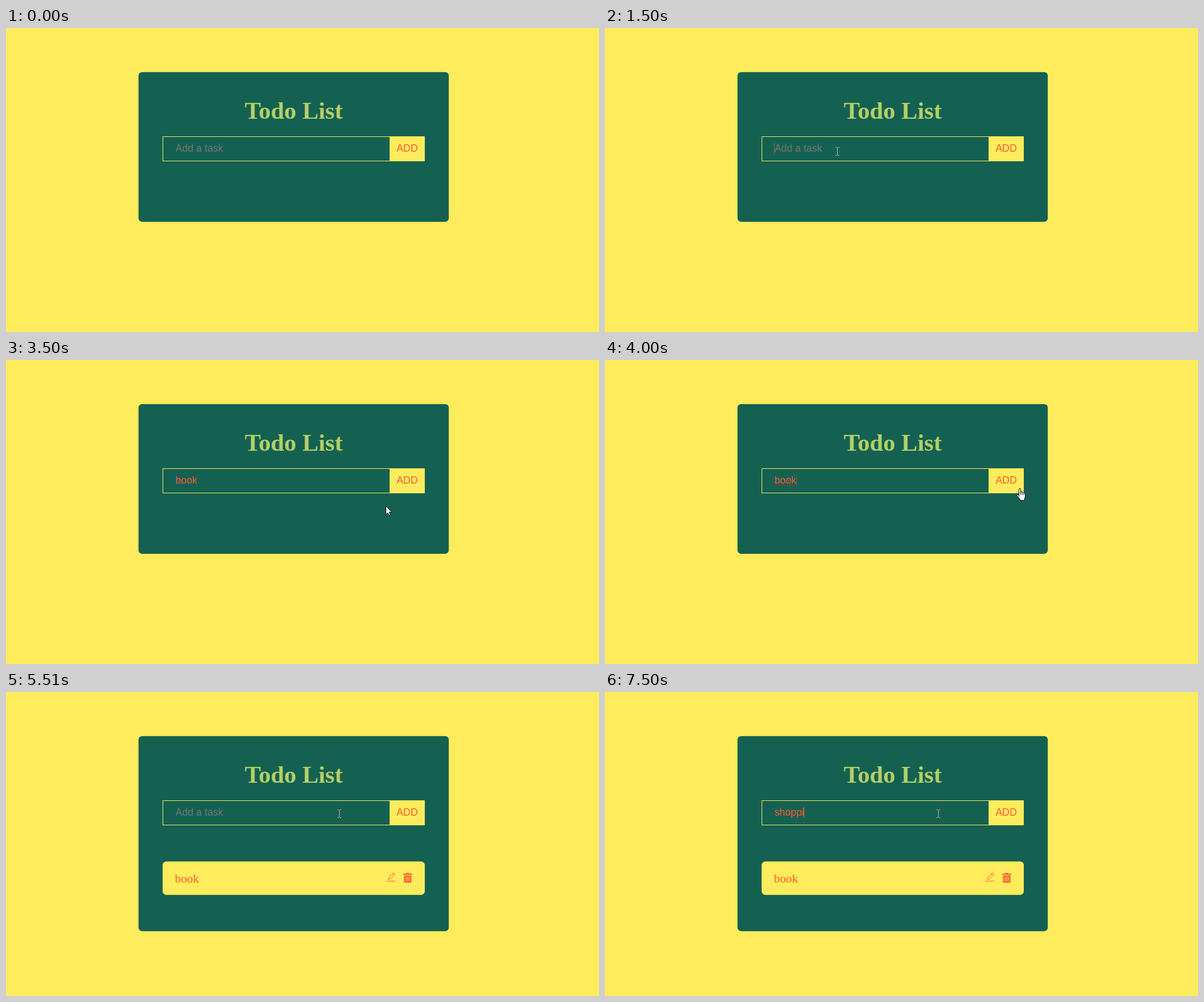
These frames come from a looping animation (1045x536 px, 8000 ms). An HTML page:

```html
<!DOCTYPE html>
<html lang="en">
<head>
<meta charset="utf-8">
<title>Todo List</title>
<style>
  :root { --sun: #ffec5c; --pine: #146152; --lime: #b4cf66; --coral: #ff5a33; }
  html, body { margin: 0; width: 100%; height: 100%; overflow: hidden; background: var(--sun); }
  svg { display: block; width: 100vw; height: 100vh; }
  rect { shape-rendering: crispEdges; }
  .round { shape-rendering: auto; }
  .sans { font: 17.78px "Liberation Sans", Arial, sans-serif; }
  .serif { font: 21.33px "Liberation Serif", "Times New Roman", serif; }
  .title { font-size: 42.67px; font-weight: 700; fill: var(--lime); }
  .coral { fill: var(--coral); }
  .sun { fill: var(--sun); }
  .line { fill: none; stroke: var(--coral); }
  .pointer { fill: #fff; stroke: #000; stroke-linejoin: round; }
</style>
</head>
<body>
<svg viewBox="0 0 1045 536">
  <rect class="round" id="card" x="233.5" y="77.7" width="546.8" rx="6.5" fill="var(--pine)"/>
  <text class="serif title" x="507" y="160" text-anchor="middle">Todo List</text>

  <rect x="276.5" y="191.5" width="461" height="43" fill="none" stroke="var(--sun)"/>
  <rect class="sun" x="676" y="191" width="62" height="44"/>
  <text class="sans coral" x="707" y="218" text-anchor="middle">ADD</text>
  <text class="sans" id="entry" x="298.67" y="218"></text>
  <path class="line" id="squiggle" style="stroke:#e8171b"/>
  <rect class="coral" id="caret" y="203" width="1" height="19"/>

  <g id="item">
    <rect class="round sun" x="276" y="298.8" width="462" height="58.9" rx="6.5"/>
    <text class="serif coral" x="297.5" y="335.5">book</text>
    <path class="line" d="M673.5 330.5l1.2-4 8.3-8 2.7 2.7-8.3 8.1zM680.6 320.6l2.8 2.8M670 333.5h16.5"/>
    <path class="coral" d="M700 320.3h5.2v-1.3h5.4v1.3h5.2v2h-15.8zM701.5 323.5h13v11q0 1.8-1.8 1.8h-9.4q-1.8 0-1.8-1.8z"/>
    <path class="sun" d="M704.4 325.5h1.2v8.3h-1.2zM707.4 325.5h1.2v8.3h-1.2zM710.4 325.5h1.2v8.3h-1.2z"/>
  </g>

  <path id="beam" fill="none" d="M-3 .5h2.5M1.5 .5h2.5M.5 1v13M-3 14.5h2.5M1.5 14.5h2.5"/>
  <path id="arrow" class="pointer" d="M.5 .5v15l3.4-3.2 2.3 5 2.3-1-2.2-4.9h4.6z"/>
  <path id="hand" class="pointer" d="M4.5 14.5V2.2q0-1.7 1.5-1.7t1.5 1.7v5q.3-1 1.4-1 1.3 0 1.5 1.5.4-.8 1.4-.8 1.2 0 1.4 1.6.4-.6 1.2-.6 1.2 0 1.2 1.6v4.5q0 2.4-1.3 4.3v3.2H6.2v-2.2Q4 17.5 1.2 13.5q-1-1.6.2-2.2 1.4-.5 3.1 1.8zM7.5 7v5M10.4 8v4M13.2 9v3"/>
</svg>
<script>
const LOOP = 8000;
const ADDED_AT = 4500;
const $ = id => document.getElementById(id);

// [start, typed text, caret x, caret opacity, pointer, pointer x, pointer y]
const steps = [
  [0,    "",       298, 0],
  [500,  "",       298, 0,   "arrow", 421, 255],
  [1000, "",       298, 0,   "beam",  409, 210],
  [1500, "",       298, .75, "beam",  409, 210],
  [2000, "b",      308, 1,   "beam",  451, 203],
  [2500, "boo",    328, 1,   "beam",  451, 203],
  [3000, "book",   337, 1,   "beam",  451, 203],
  [3500, "book",   337, 0,   "arrow", 669, 257],
  [4000, "book",   337, .4,  "hand",  725, 226],
  [4500, "",       298, 0,   "beam",  521, 219],
  [5000, "",       298, .75, "beam",  587, 207],
  [5510, "",       298, 0,   "beam",  587, 207],
  [6000, "s",      307, 1,   "beam",  587, 207],
  [6500, "sho",    327, .55, "beam",  587, 207],
  [7000, "shop",   337, 1,   "beam",  587, 207],
  [7500, "shoppi", 350, 1,   "beam",  587, 207]
];

const show = (node, on) => { node.style.display = on ? "" : "none"; };

$("squiggle").setAttribute("d", "M298 222" + "l2-2 2 2".repeat(10));

function render(step) {
  const [start, typed, caretX, caretAlpha, pointer, x, y] = step;
  const added = start >= ADDED_AT;
  $("card").setAttribute("height", added ? 344 : 264);
  show($("item"), added);

  $("entry").textContent = typed || "Add a task";
  $("entry").style.fill = typed ? "var(--coral)" : "#757575";
  $("caret").setAttribute("x", caretX);
  $("caret").setAttribute("opacity", caretAlpha);
  show($("squiggle"), start === 4000);

  for (const name of ["beam", "arrow", "hand"]) {
    show($(name), name === pointer);
    if (name === pointer) $(name).setAttribute("transform", `translate(${x} ${y})`);
  }
  $("beam").style.stroke = start >= 5000 ? "#e3a5b0" : "#c4bfbd";
}

let current;
function tick() {
  const time = performance.now() % LOOP;
  const step = steps.findLast(([start]) => start <= time);
  if (step !== current) render(current = step);
  requestAnimationFrame(tick);
}
tick();
</script>
</body>
</html>
```
